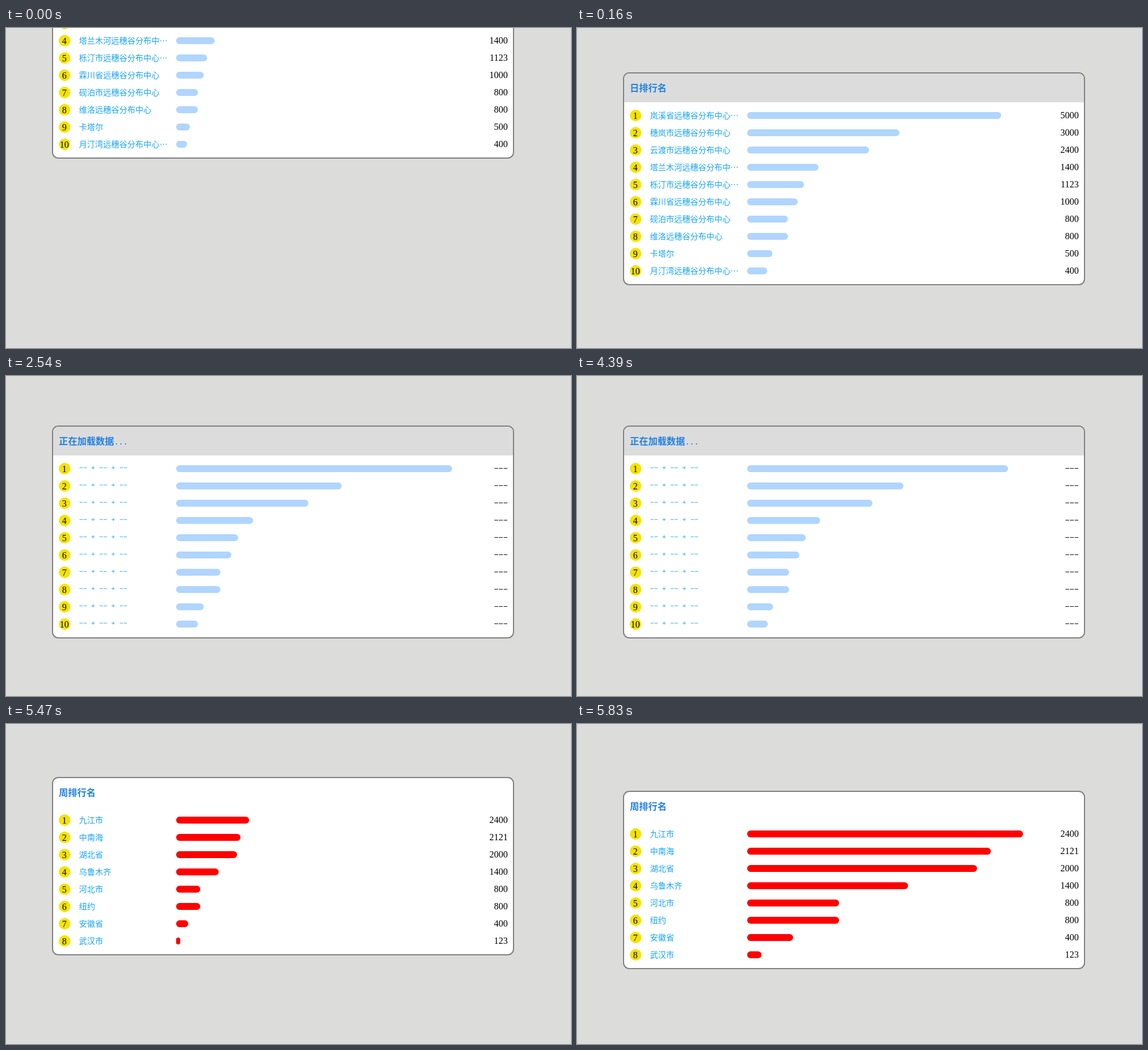
Animation, 983 px wide and 556 px high, one loop 8000 ms. Source, as an HTML page:

```html
<!DOCTYPE html>
<html lang="zh-CN">
<head>
<meta charset="utf-8">
<title>排行名</title>
<style>
html, body { margin: 0; width: 100%; height: 100%; overflow: hidden; background: #dcdcda; }
body { position: relative; }
.card {
  position: absolute; left: 80px; top: 0; width: 804px; box-sizing: border-box;
  padding-bottom: 8px; border: 2px solid #808080; border-radius: 11px;
  background: #fff; overflow: hidden;
}
.head {
  position: relative; height: 50px; margin-bottom: 8px; padding-left: 10px; color: #2080e4;
  font: bold 16px/48px "Noto Sans CJK SC", "Noto Sans CJK", sans-serif;
}
.day .head { background: #dcdcdc; }
.dots { font: bold 13.333px "Liberation Mono", monospace; }
.row { position: relative; height: 30px; font: 16px/30px "Liberation Serif", serif; color: #000; }
.row > * { position: absolute; top: 0; white-space: pre; }
.row .rank {
  left: 10px; top: 5px; width: 20px; height: 20px; padding-right: 1px; box-sizing: border-box;
  border-radius: 50%; background: #f6e300; line-height: 21px; text-align: center;
}
.row .name {
  left: 45px; top: -1px; color: #14a4f4;
  font: 14px/30px "Noto Sans CJK SC", "Noto Sans CJK", sans-serif;
}
.row .bar { left: 214px; top: 9px; height: 12px; border-radius: 6px; background: #b0d5ff; }
.week .bar { background: #f00; }
.row .value { right: 9px; }
.loading .name { top: -1px; font: 11.667px/30px "Liberation Mono", monospace; }
.loading .value { top: 1px; font: 13.333px/30px "Liberation Mono", monospace; }
</style>
</head>
<body>
<script>
const LOOP = 8000, TICK = 40, BAR = 480;
const LOAD = 2540, SHRINK = 4390, SWAP = 5230;

const center = '远穗谷分布中心';
const dayRows = [
  ['岚溪省' + center + '…', 5000],
  ['穗岚市' + center, 3000],
  ['云渡市' + center, 2400],
  ['塔兰木河远穗谷分布中…', 1400],
  ['栎汀市' + center + '…', 1123],
  ['霖川省' + center, 1000],
  ['砚泊市' + center, 800],
  ['维洛' + center, 800],
  ['卡塔尔', 500],
  ['月汀湾' + center + '…', 400]
];
const weekRows = [
  ['九江市', 2400], ['中南海', 2121], ['湖北省', 2000], ['乌鲁木齐', 1400],
  ['河北市', 800], ['纽约', 800], ['安徽省', 400], ['武汉市', 123]
];

function add(parent, cls, text = '') {
  const el = document.createElement('div');
  el.className = cls;
  el.textContent = text;
  parent.append(el);
  return el;
}

function makeCard(cls, title, data) {
  const el = add(document.body, 'card ' + cls);
  const head = add(el, 'head', title);
  const rows = data.map(([name, value], i) => {
    const row = add(el, 'row');
    add(row, 'rank', i + 1);
    return {
      name: add(row, 'name', name),
      bar: add(row, 'bar'),
      value: add(row, 'value', value),
      share: value / data[0][1],
      texts: [name, value]
    };
  });
  return { el, head, title, rows };
}

const day = makeCard('day', '日排行名', dayRows);
const week = makeCard('week', '周排行名', weekRows);

// CSS-style cubic-bezier, solved by bisection
function bezier(x1, y1, x2, y2) {
  const at = (a, b, s) => 3 * (1 - s) * (1 - s) * s * a + 3 * (1 - s) * s * s * b + s * s * s;
  return x => {
    if (x <= 0) return 0;
    if (x >= 1) return 1;
    let lo = 0, hi = 1;
    for (let i = 0; i < 24; i++) {
      const mid = (lo + hi) / 2;
      if (at(x1, x2, mid) < x) lo = mid; else hi = mid;
    }
    return at(y1, y2, lo);
  };
}
const ease = bezier(0.25, 0.1, 0.25, 1);
const easeInOut = bezier(0.42, 0, 0.58, 1);

function setLoading(on) {
  if (day.loading === on) return;
  day.loading = on;
  day.el.classList.toggle('loading', on);
  day.head.innerHTML = on ? '正在加载数据<span class="dots">...</span>' : day.title;
  for (const r of day.rows) {
    r.name.textContent = on ? '−− + −− + −−' : r.texts[0];
    r.value.textContent = on ? '−−−' : r.texts[1];
  }
}

function place(card, top, grow) {
  card.el.style.transform = `translateY(${Math.round(top)}px)`;
  for (const r of card.rows) r.bar.style.width = BAR * r.share * grow + 'px';
}

function draw(time) {
  const phase = time < LOAD ? 0 : SHRINK % TICK;
  const t = Math.floor((time - phase) / TICK) * TICK + phase;
  const isWeek = time >= SWAP;
  day.el.style.visibility = isWeek ? 'hidden' : 'visible';
  week.el.style.visibility = isWeek ? 'visible' : 'hidden';
  setLoading(time >= LOAD);

  if (isWeek) {
    place(week, 86 + 30 * easeInOut((t - 5306) / 530), easeInOut((t - 5281) / 530));
  } else if (time < LOAD) {
    place(day, 86 - 229 * Math.max(0, 1 - t / 225) ** 2.6, easeInOut((t + 265) / 530));
  } else {
    place(day, 86, 1 - ease((t - 4348) / 600));
  }
}

const start = performance.now();
function frame() {
  draw((performance.now() - start) % LOOP);
  requestAnimationFrame(frame);
}
frame();
</script>
</body>
</html>
```
